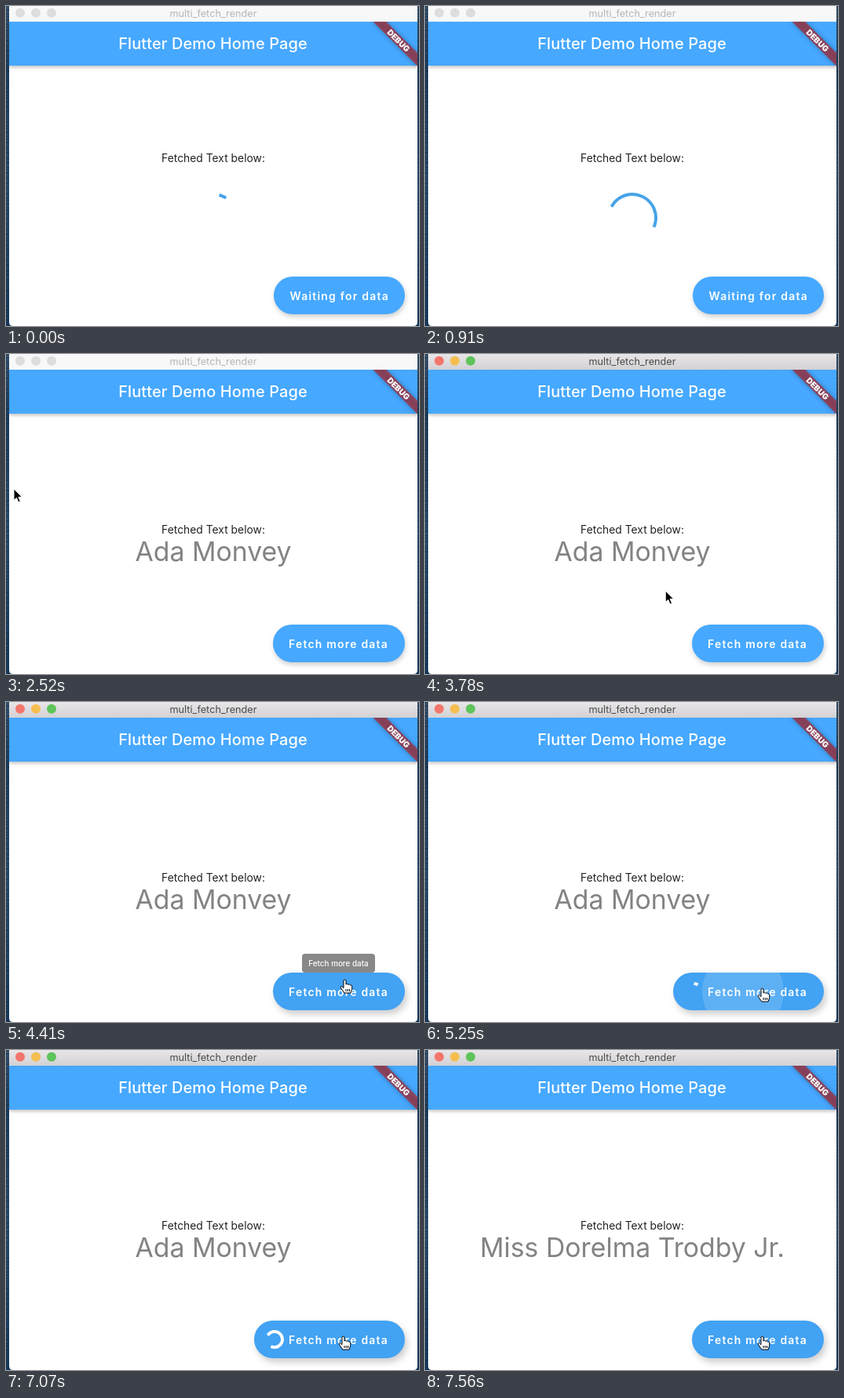
Animation, 526 px wide and 408 px high, one loop 8000 ms. Source, as an HTML page:

```html
<!DOCTYPE html>
<html lang="en">
<head>
<meta charset="utf-8">
<title>multi_fetch_render</title>
<style>
  html, body { margin: 0; width: 100%; height: 100%; overflow: hidden; background: #fff; }
  svg { display: block; width: 526px; height: 408px; font-family: Inter, Roboto, sans-serif; }
  .center { text-anchor: middle; }
  #fab { fill: #46a8ff; filter: drop-shadow(1px 3px 3px #0003); }
  #fab.hover { fill: #42a2f3; filter: drop-shadow(3px 5px 4px #0003); }
  .arc { fill: none; stroke-width: 4; stroke-linecap: square; }
</style>
</head>
<body>
<svg viewBox="0 0 526 408">
  <defs>
    <linearGradient id="desk" x2="0" y2="1">
      <stop offset="0" stop-color="#34506b"/>
      <stop offset=".2" stop-color="#1d3c5c"/>
      <stop offset=".55" stop-color="#2a4c6d"/>
      <stop offset="1" stop-color="#17395c"/>
    </linearGradient>
    <linearGradient id="chrome" x2="0" y2="1">
      <stop offset="0" stop-color="#e8e6e8"/>
      <stop offset="1" stop-color="#d3d1d3"/>
    </linearGradient>
    <clipPath id="window"><path d="M4 0H524V403Q524 408 519 408H9Q4 408 4 403Z"/></clipPath>
    <clipPath id="app"><rect x="4" y="20" width="520" height="388"/></clipPath>
    <clipPath id="fabClip"><rect id="fabClipBox" y="345" height="48" rx="24"/></clipPath>
  </defs>

  <rect width="526" height="408" fill="url(#desk)"/>
  <path d="M2 0V408M525 0V408" stroke="#0b1f33" stroke-opacity=".35" stroke-width="4" stroke-dasharray="1 3 2 4 1 2"/>
  <g clip-path="url(#window)">
    <rect x="4" width="520" height="408" fill="#fff"/>
    <rect x="4" y="20" width="520" height="56" fill="#46a8ff" style="filter:drop-shadow(0 2px 2px #0004)"/>
    <rect id="bar" x="4" width="520" height="20"/>
    <circle class="dot" cx="18" cy="8.7" r="6"/>
    <circle class="dot" cx="38" cy="8.7" r="6"/>
    <circle class="dot" cx="58" cy="8.7" r="6"/>
    <text id="title" class="center" x="264" y="13.7" font-size="12.7">multi_fetch_render</text>
    <text class="center" x="263.5" y="55" font-size="20" letter-spacing=".1" font-weight="500" fill="#fff">Flutter Demo Home Page</text>

    <g clip-path="url(#app)">
      <g transform="translate(524 20) rotate(45)">
        <rect x="-40" y="28" width="80" height="12" fill="#b71c1ca0" style="filter:drop-shadow(0 0 3px #0007)"/>
        <text class="center" y="37.8" font-size="10.2" font-weight="900" fill="#fff">DEBUG</text>
      </g>
    </g>

    <text id="label" class="center" x="264" font-size="13.85" fill="#222">Fetched Text below:</text>
    <text id="name" class="center" x="264" y="263.5" font-size="33.8" fill="#838383"></text>
    <path id="bigArc" class="arc" stroke="#46a3e8"/>

    <rect id="fab" y="345" height="48" rx="24"/>
    <circle id="splash" cy="369" fill="#fff" clip-path="url(#fabClip)"/>
    <path id="smallArc" class="arc" stroke="#fff"/>
    <text id="action" y="375" font-size="13.9" font-weight="600" letter-spacing="1.25" fill="#fff"></text>

    <g id="tip">
      <rect x="377" y="321" width="93" height="24" rx="4" fill="#616161"/>
      <text class="center" x="423.5" y="336.7" font-size="9.9" font-weight="500" fill="#fff">Fetch more data</text>
    </g>
  </g>

  <g id="cursor" stroke-linejoin="round">
    <path id="arrow" d="M0 0V14.5L3.4 11.4 5.8 17 8.3 16 5.9 10.4H10.4Z" fill="#000" stroke="#fff"/>
    <path id="hand" fill="#fff" stroke="#000" transform="translate(-1.5 0)" d="M-1.5 1Q0-.8 1.5 1V6Q3 4.6 4.4 6.3 6 5.2 7 7 9.2 6.4 9.2 8.6V11.5L7.6 17H-.6L-4.9 10.8Q-6 8.6-4.1 8.5L-1.5 10.6ZM1.5 12v3M3.8 12v3M6 12v3"/>
  </g>
</svg>
<script>
const LOOP = 8000, STEP = 70;
const FIRST_DATA = 1820, FOCUS = 3430, HOVER = 3990, PRESS = 4830, REFETCH = 5180, SECOND_DATA = 7490;
const $ = id => document.getElementById(id);
const dots = document.querySelectorAll('.dot');
const set = (id, attrs) => { for (const key in attrs) $(id).setAttribute(key, attrs[key]); };
const show = (id, on) => set(id, { visibility: on ? 'visible' : 'hidden' });

// Piecewise linear track of [time, value, value...] keys
function track(keys, t) {
  if (t <= keys[0][0]) return keys[0].slice(1);
  for (let i = 1; i < keys.length; i++) {
    const a = keys[i - 1], b = keys[i];
    if (t < b[0]) {
      const k = (t - a[0]) / (b[0] - a[0]);
      return a.slice(1).map((v, j) => v + (b[j + 1] - v) * k);
    }
  }
  return keys.at(-1).slice(1);
}

// cubic-bezier(.4, 0, .2, 1)
function fastOutSlowIn(x) {
  if (x <= 0) return 0;
  if (x >= 1) return 1;
  let lo = 0, hi = 1, s;
  for (let i = 0; i < 24; i++) {
    s = (lo + hi) / 2;
    const bx = 1.2 * s * (1 - s) ** 2 + .6 * s * s * (1 - s) + s ** 3;
    if (bx < x) lo = s; else hi = s;
  }
  return s * s * (3 - 2 * s);
}

// Material indeterminate spinner: one grow-and-shrink per cycle, plus a steady turn
function spinner(cx, cy, r, cycles) {
  const phase = cycles % 1;
  const head = fastOutSlowIn(phase * 2), tail = fastOutSlowIn(phase * 2 - 1);
  const start = Math.PI * (-.5 + 1.5 * tail + .5 * phase + 1.2 * cycles);
  const sweep = Math.max(1.5 * Math.PI * (head - tail), .01);
  const point = a => `${cx + r * Math.cos(a)} ${cy + r * Math.sin(a)}`;
  return `M${point(start)}A${r} ${r} 0 ${+(sweep > Math.PI)} 1 ${point(start + sweep)}`;
}

const cursorPath = [
  [2520, 10, 172], [2730, 70, 202], [3150, 70, 202], [3290, 95, 215], [3430, 95, 215],
  [3990, 433, 354], [4410, 433, 354], [4620, 431, 365]
];
const tipFade = [[4200, 0], [4410, .75], [4480, .9], [PRESS, .9], [4970, 0]];
const splashTrack = [  // time, centre x, radius, opacity
  [PRESS, 431, 0, .15], [REFETCH, 412, 24, .16], [5250, 405, 52, .15], [5460, 412, 100, 0]
];

function render(t) {
  const loading = t < FIRST_DATA, focused = t >= FOCUS, hover = t >= HOVER;
  const refetching = t >= REFETCH && t < SECOND_DATA;

  set('bar', { fill: focused ? 'url(#chrome)' : '#f8f8f8' });
  set('title', { fill: focused ? '#4b4b4b' : '#b6b6b6' });
  dots.forEach((dot, i) =>
    dot.setAttribute('fill', focused ? ['#f2766b', '#f5be50', '#5fc45a'][i] : '#dddddd'));

  set('label', { y: loading ? 198.7 : 228.7 });
  $('name').textContent = loading ? '' : t < SECOND_DATA ? 'Ada Monvey' : 'Miss Dorelma Trodby Jr.';
  show('bigArc', loading);
  if (loading) set('bigArc', { d: spinner(264, 270, 30, .06 + t / 1537) });

  const left = loading ? 341 : refetching ? 316 : 340;
  set('fab', { x: left, width: 508 - left, class: hover ? 'hover' : '' });
  set('fabClipBox', { x: left, width: 508 - left });
  $('action').textContent = loading ? 'Waiting for data' : 'Fetch more data';
  set('action', { x: loading ? 361.5 : 360 });
  show('smallArc', refetching);
  if (refetching) set('smallArc', { d: spinner(342, 369, 10, (t - REFETCH) / 1436) });

  const [cx, r, opacity] = track(splashTrack, t);
  set('splash', { cx, r, opacity });
  set('tip', { opacity: track(tipFade, t)[0] });

  const [x, y] = track(cursorPath, t), visible = t >= 2520;
  set('cursor', { transform: `translate(${x} ${y})` });
  show('arrow', visible && !hover);
  show('hand', visible && hover);
}

const began = performance.now();
function tick() {
  const t = (performance.now() - began) % LOOP;
  render(Math.floor(t / STEP) * STEP);
  requestAnimationFrame(tick);
}
tick();
</script>
</body>
</html>
```
